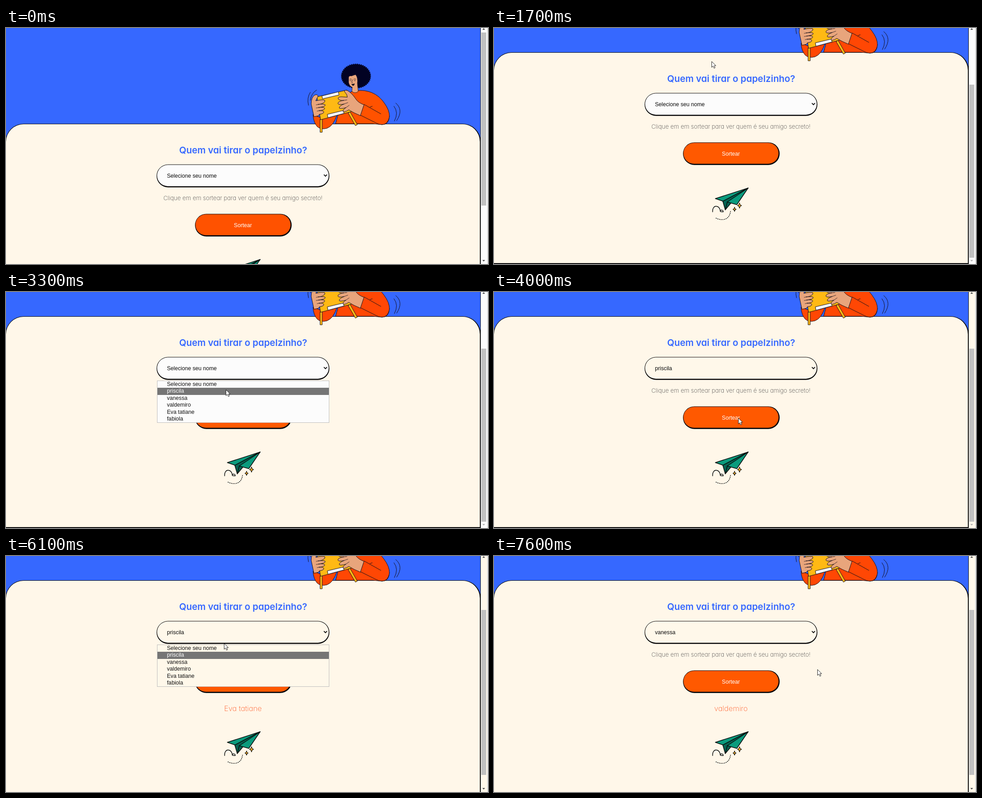
These frames come from a looping animation (1066 px wide and 525 px high, 8000 ms). An HTML page:

```html
<!DOCTYPE html>
<html lang="pt-BR">
<head>
<meta charset="utf-8">
<title>Sorteio</title>
<style>
html, body { margin: 0; width: 100%; height: 100%; overflow: hidden; }
#stage { --white: #fcfcfc; --orange: #ff5200; --shirt: #ff5200;
  position: relative; width: 1066px; height: 525px; overflow: hidden; background: #3668ff; }
#stage.scrolled { --orange: #ff5900; --shirt: #ff4704; }
#stage.picked { --white: #fff8ea; }
#stage div, #stage svg { position: absolute; box-sizing: border-box; }
#page { left: 0; top: 0; width: 1050px; height: 684px; }
.panel { left: -1px; top: 213px; width: 1051px; bottom: 0; background: #fff7e9;
  border: solid #060608; border-width: 1px 2px 2px 1px; border-radius: 40px 40px 0 0; }
svg { left: 0; top: 0; overflow: visible; }
.edge { fill: #060608; }
.field { fill: var(--white); }
.action { fill: var(--orange); }
.shirt { fill: var(--shirt); }
.ui { font: 12.15px "Liberation Sans", Arial, sans-serif; }
.soft { font-family: Inter, "Open Sans", sans-serif; font-feature-settings: "cv11"; text-anchor: middle; }
#popup { left: 334px; top: 356px; width: 381px; height: 94px; background: var(--white); border: 1px solid #bdbdbd; }
#popup div { left: 0; width: 379px; height: 15.4px; padding-left: 21px; line-height: 15.4px; color: #111; }
#popup .on { background: #757575; color: #fff; }
#bar { left: 1049px; top: 0; width: 17px; height: 525px; background: var(--white);
  border-left: 1px solid #111; box-shadow: inset -2px 0 #e4e4e4; }
#thumb { left: 1px; width: 11px; background: #c1c1c1; }
</style>
</head>
<body>
<div id="stage">
  <div id="page">
    <div class="panel"></div>
    <svg width="1050" height="720">
      <text class="soft" x="524.5" y="279" font-size="20.4" font-weight="600" fill="#3668ff">Quem vai tirar o papelzinho?</text>

      <rect class="edge" x="333" y="303.5" width="382.3" height="51" rx="25.500"/>
      <rect class="field" x="334.2" y="304.6" width="379.5" height="47.300" rx="23.700"/>
      <text class="ui" id="choice" x="356" y="332.5" fill="#0b0b0b"></text>
      <path d="M703 326.2l3.5 3.5 3.5-3.5" fill="none" stroke="#0b0b0b" stroke-width="1.8"/>

      <text class="soft" x="524" y="383" font-size="13.15" font-weight="200" fill="#444">Clique em em sortear para ver quem é seu amigo secreto!</text>

      <rect class="edge" x="418" y="413.4" width="213.8" height="50.300" rx="25.100"/>
      <rect class="action" x="419.1" y="414.4" width="210.2" height="46.700" rx="23.300"/>
      <text class="ui" x="524" y="442.7" text-anchor="middle" fill="#fff">Sortear</text>
      <text class="soft" id="result" x="524" y="503.5" font-size="16.4" font-weight="200" fill="#ff5a26"></text>

      <g id="plane" stroke="#0a0d0d" stroke-width="1.5" stroke-linejoin="round" stroke-linecap="round">
        <path d="M562 436L489.500 459.500 507 465.500Z" fill="#0a9b7d"/>
        <path d="M562 436L506 465.500 511.500 484.500 524 469.500Z" fill="#056452"/>
        <path d="M562 436L516 467 537 473Z" fill="#0a9b7d"/>
        <path d="M516 467L511.500 484.500" fill="none"/>
        <g fill="#f5a623" stroke-width="1.200">
          <path d="M543 469q1 5 4.500 6-3.500 1-4.500 6-1-5-4.500-6 3.500-1 4.500-6Z"/>
          <path d="M532 478.500q.8 4 3.500 4.800-2.700.8-3.500 4.800-.8-4-3.500-4.800 2.700-.8 3.500-4.800Z"/>
        </g>
        <g fill="none">
          <path d="M483.500 489C483 481 487 476 491.500 476.500 497 477 500 482 500.500 488 501 484 507 484 507 489L501 488.500"/>
          <path d="M491 503C506 510 521 506 523 488" stroke-dasharray="1 2.800"/>
        </g>
      </g>

      <g stroke="#16101c" stroke-width="1" stroke-linejoin="round" stroke-linecap="round">
        <!-- torso and far sleeve -->
        <path class="shirt" d="M757 146Q764 139 780 139C806 138 824 149 836 166Q848 182 848 196Q847 215 832 215L812 213H729L735 190Z"/>
        <path class="shirt" d="M679 193Q680 210 688 219 696 227 710 223 724 218 732 193L698 200Z"/>
        <!-- head -->
        <ellipse cx="774" cy="107" rx="31.500" ry="26" fill="#020223" stroke="#020223" stroke-width="3.600" stroke-dasharray="0 4.200"/>
        <path d="M766 128L765 141Q772 147 779 141L777 122Z" fill="#e8a57c" stroke-width=".8"/>
        <path d="M758 111Q758 106 764 107L773 104Q778 110 777 121 776 132 768 132 760 131 758 121Z" fill="#e8a57c" stroke="none"/>
        <path d="M760 114q2-1.500 4 0M769 114q2.500-1.500 5 0M760 117h3M770 117h3M766 115l-1.500 6 2 .5" fill="none" stroke-width=".8"/>
        <path d="M764 124q4 1.500 7-1 0 5-3.500 5.500Q765 128 764 124Z" fill="#16101c" stroke="none"/>
        <!-- box -->
        <path d="M695 203h4.300v29h-4.300ZM757 189l4-2.500 16 28.500-4 2Z" fill="#ffb914"/>
        <path d="M688 153L754 138 764 186 696 204Z" fill="#ffb914"/>
        <path d="M699 151l36-9 1.500 7-36 8.500ZM711 192l35-8.500 1.500 6.500-35 9.500Z" fill="#f6f6fa"/>
        <!-- hands -->
        <path d="M681 197L675 169Q675 154 683 149 690 147 690 152L685 162Q703 158 705 161 707 165 697 169L690 170Q704 168 706 171 707 175 691 177 704 175 705 179 704 183 692 184 702 183 703 187 702 191 693 192L691 195Z" fill="#e8a57c"/>
        <path d="M792 171Q778 166 773 157 764 144 755 139 747 137 749 142 755 148 755 154L742 153Q733 153 735 158 739 162 747 161 734 163 734 168 735 172 748 169 737 173 737 178 739 181 752 177 746 180 745 185 748 189 758 182 769 189 784 195Z" fill="#e8a57c"/>
        <path d="M747 161l7-1M748 169l8-3M752 177l7-5M690 170l-4 1M691 177l-5 1M692 184l-4 1" fill="none" stroke-width=".8"/>
        <!-- near forearm -->
        <path class="shirt" d="M792 170L784 194 820 212Q831 217 839 213 847 207 848 196 838 199 829 191Z" stroke="none"/>
        <path d="M829 191L792 170 784 194 820 212Q831 217 839 213 847 207 848 196M805 176l5-2" fill="none"/>
        <!-- shaking lines -->
        <path d="M673 143Q665 155 669 172M687 138Q675 145 673 161M862 167Q880 182 864 206M858 174Q869 188 859 207" fill="none"/>
      </g>
    </svg>
    <div id="popup" class="ui"></div>
  </div>

  <div id="bar">
    <div id="thumb"></div>
    <svg width="16" height="525" fill="#4d4d4d">
      <path d="M3.500 4h6l-3-3.500Z"/>
      <path id="down" d="M3.500 516h6l-3 3.500Z"/>
    </svg>
  </div>
  <svg id="cursor" width="11" height="17">
    <path d="M.5.5V13.500L3.500 10.700 5.700 15.500 8 14.500 5.900 9.900H9.800Z" fill="#fff" stroke="#111" stroke-width=".9"/>
  </svg>
</div>
<script>
const $ = id => document.getElementById(id);
const LOOP = 8000, STEP = 100, ROW = 15.4;
const names = ['Selecione seu nome', 'priscila', 'vanessa', 'valdemiro', 'Eva tatiane', 'fabiola'];

// Pointer path: time, x, y
const path = [
  [300, 92, 11], [500, 481, 74], [1800, 481, 74], [2300, 498, 168], [2500, 498, 168],
  [2600, 491, 202], [2700, 491, 202], [3000, 486, 217], [3600, 486, 217], [4000, 540, 280],
  [4100, 540, 280], [4400, 756, 163], [5000, 756, 163], [5200, 656, 162], [5300, 656, 162],
  [5400, 602, 151], [5600, 602, 151], [5900, 510, 172], [6000, 510, 172], [6300, 425, 239],
  [6700, 425, 239], [6800, 432, 246], [7100, 520, 282], [7200, 520, 282], [7600, 715, 252]
];

const rows = names.map((name, i) => {
  const row = document.createElement('div');
  row.textContent = name;
  row.style.top = i * ROW + 'px';
  $('popup').append(row);
  return row;
});

const within = (t, a, b) => t >= a && t < b;
const show = (el, on) => { el.style.visibility = on ? 'visible' : 'hidden'; };

function pointer(t) {
  const i = path.findIndex(p => p[0] > t);
  if (i < 0) return path[path.length - 1].slice(1);
  if (i === 0) return path[0].slice(1);
  const [t0, x0, y0] = path[i - 1], [t1, x1, y1] = path[i];
  const k = (t - t0) / (t1 - t0);
  return [x0 + (x1 - x0) * k, y0 + (y1 - y0) * k];
}

function draw(time) {
  const t = Math.floor(time % LOOP / STEP) * STEP;
  const scroll = t < 1200 ? 0 : t < 1700 ? 79 : 159;
  const drawn = t >= 4100;
  const picked = t < 3400 ? 0 : t < 6400 ? 1 : 2;
  const open = within(t, 2500, 3400) || within(t, 6000, 6400);
  const [x, y] = pointer(t).map(Math.round);

  $('stage').classList.toggle('scrolled', scroll === 159);
  $('stage').classList.toggle('picked', t >= 3700);
  $('page').style.transform = `translateY(${-scroll}px)`;
  $('page').style.height = (drawn ? 719 : 684) + 'px';
  $('plane').setAttribute('transform', `translate(0 ${drawn ? 114 : 79})`);
  $('choice').textContent = names[picked];
  $('result').textContent = !drawn ? '' : names[t < 7200 ? 4 : 3];

  show($('popup'), open);
  const hover = y < 198 ? picked : Math.min(5, Math.floor((y - 198 + .5) / ROW));
  rows.forEach((row, i) => row.classList.toggle('on', i === hover));

  $('thumb').style.top = Math.round(10 + scroll * (drawn ? 110 : 116) / 159) + 'px';
  $('thumb').style.height = (drawn ? 367 : 385) + 'px';
  $('down').setAttribute('fill', scroll === 159 && !drawn ? '#b0b0b0' : '#4d4d4d');

  show($('cursor'), t >= 300 && !within(t, 6400, 6600));
  $('cursor').style.transform = `translate(${x}px, ${y}px)`;
}

function tick() {
  draw(performance.now());
  requestAnimationFrame(tick);
}
tick();
</script>
</body>
</html>
```
